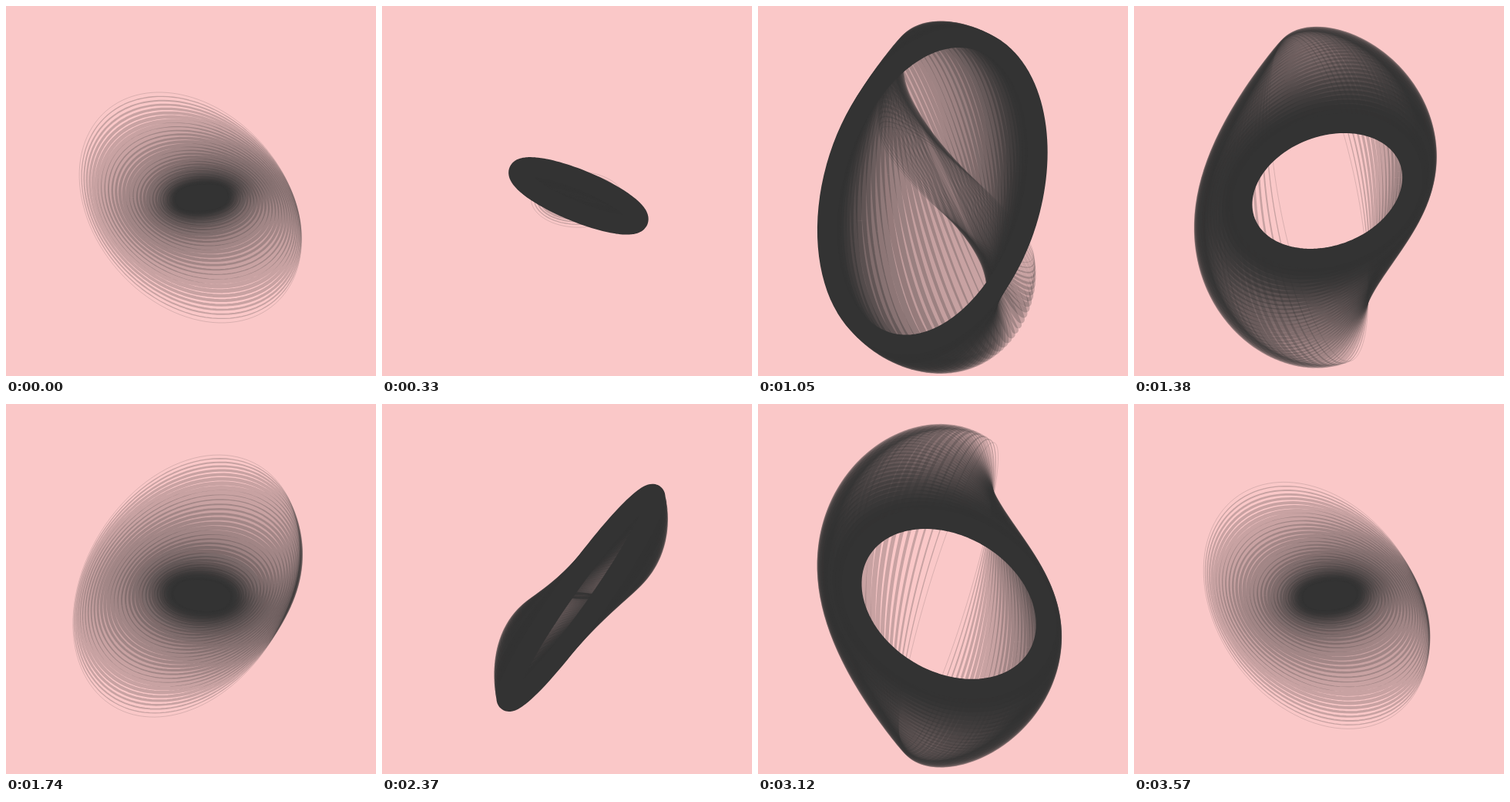
Recreate the animation shown at these times as an HTML page with a canvas. Size 480 by 480 pixels, loop 3600 ms.

```html
<!DOCTYPE html>
<html lang="en">
<head>
<meta charset="utf-8">
<title>Tumbling ring</title>
<style>
  html, body { margin: 0; width: 100%; height: 100%; overflow: hidden; background: #fac8c8; }
  canvas { display: block; width: 480px; height: 480px; }
</style>
</head>
<body>
<canvas id="stage" width="480" height="480"></canvas>
<script>
  const ctx = document.getElementById('stage').getContext('2d');
  const SIZE = 480, CX = 254, CY = 248.5;
  const RADIUS = 210, STROKE = 26, DEPTH = 700;
  const LOOP = 3600, TICK = 30;
  const RINGS = 40, LAG = 0.5, SEGMENTS = 120;
  const rad = deg => deg * Math.PI / 180;

  // The ring swells and shrinks twice per loop.
  function ringScale(p) {
    const phase = rad(6 * p);
    return 0.1 + 0.45 * (1 - Math.cos(phase)) + 0.035 * Math.sin(phase) ** 2;
  }

  // Two perpendicular unit vectors spanning the plane of the ring.
  function ringPlane(p) {
    const a = rad(3 * (p - 32) + 6 * Math.sin(rad(6 * (p - 12))));
    const b = rad(3 * (52 - p));
    return {
      u: [Math.cos(b), 0, -Math.sin(b)],
      v: [-Math.sin(a) * Math.sin(b), Math.cos(a), -Math.sin(a) * Math.cos(b)]
    };
  }

  function traceRing(p) {
    const { u, v } = ringPlane(p), r = RADIUS * ringScale(p);
    ctx.beginPath();
    for (let i = 0; i < SEGMENTS; i++) {
      const angle = 2 * Math.PI * i / SEGMENTS;
      const c = r * Math.cos(angle), s = r * Math.sin(angle);
      const [x, y, z] = u.map((value, k) => value * c + v[k] * s);
      const zoom = DEPTH / (DEPTH - z);
      ctx.lineTo(CX + x * zoom, CY + y * zoom);
    }
    ctx.closePath();
  }

  // The leading ring is solid; its echoes get thinner and fainter.
  function draw(time) {
    const p = Math.floor((time % LOOP) / TICK);
    ctx.globalAlpha = 1;
    ctx.fillStyle = '#fac8c8';
    ctx.fillRect(0, 0, SIZE, SIZE);
    ctx.strokeStyle = '#333';
    ctx.lineJoin = 'round';
    for (let k = RINGS - 1; k >= 0; k--) {
      const strength = 1 - k / RINGS;
      ctx.globalAlpha = 0.25 + 0.75 * strength ** 6;
      ctx.lineWidth = STROKE * strength;
      traceRing(p - k * LAG);
      ctx.stroke();
    }
  }

  const start = performance.now();
  function loop() {
    draw(performance.now() - start);
    requestAnimationFrame(loop);
  }
  loop();
</script>
</body>
</html>
```
